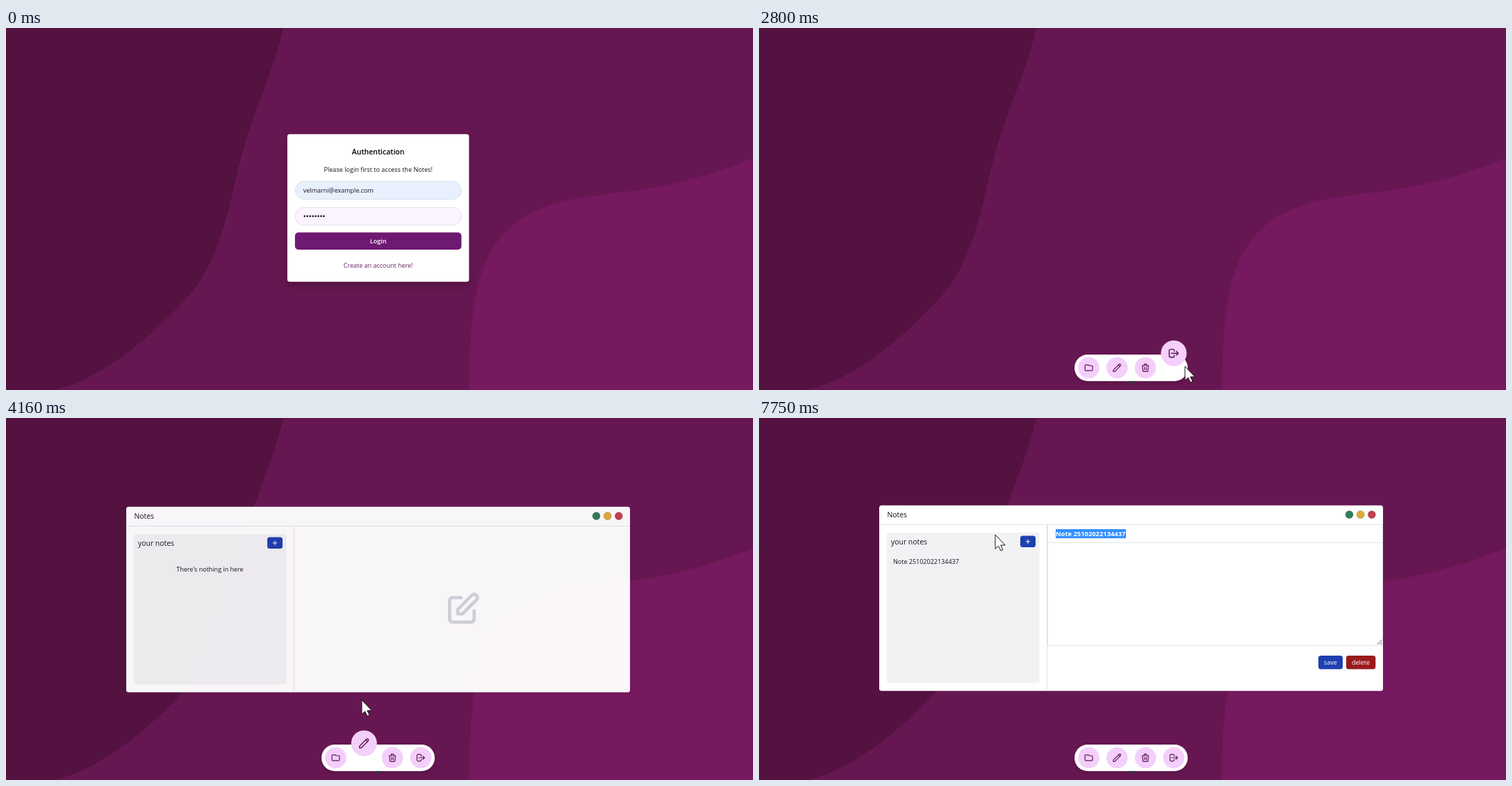
An HTML page that plays this animation: 1075 by 521 pixels, repeating every 8 s.

```html
<!DOCTYPE html>
<html lang="en">
<head>
<meta charset="utf-8">
<title>Notes</title>
<style>
  html, body { margin: 0; width: 100%; height: 100%; overflow: hidden; background: #661751; }
  svg { display: block; width: 1075px; height: 521px; }
  text { font: 9px "Open Sans", "Noto Sans", sans-serif; fill: #1a1220; }
  .mid { text-anchor: middle; }
  .white { fill: #fff; }
  .line { stroke: #e2e4e8; fill: none; }
  .bold { font-weight: 700; font-size: 9.4px; }
  .head { font-size: 10.4px; font-weight: 500; }
  .icon { fill: none; stroke-width: 2; stroke-linecap: round; stroke-linejoin: round; }
  #card { filter: drop-shadow(0 5px 5px rgba(30, 0, 25, .3)); }
  #dock > rect { filter: drop-shadow(0 2px 2px rgba(30, 0, 25, .25)); }
</style>
</head>
<body>
<svg viewBox="0 0 1075 521">
  <rect width="1075" height="521" fill="#661751"/>
  <path fill="#531240" d="M399 0C385 62 357 118 339 183C320 255 310 340 253 396C200 452 140 502 72 521H0V0Z"/>
  <path fill="#76195f" d="M1075 188C1040 200 985 224 897 235C843 242 780 246 735 279C678 322 668 395 666 521H1075Z"/>

  <g id="card">
    <rect x="405" y="153" width="261.5" height="212.5" rx="3.5" fill="#fff"/>
    <text class="mid" x="535.8" y="182" style="font-size:10.5px;font-weight:600;fill:#000">Authentication</text>
    <text class="mid" x="535.8" y="207" style="font-size:9.1px">Please login first to access the Notes!</text>
    <rect x="416.5" y="221" width="239" height="25.5" rx="12.7" fill="#e8f0fd" stroke="#d7deea"/>
    <text x="428" y="237.3">velmarni@example.com</text>
    <rect x="416.5" y="258.5" width="239" height="25.5" rx="12.7" fill="#fcf4ff" stroke="#e6dfec"/>
    <path d="M429.9 271h28" stroke="#1a1220" stroke-width="2.7" stroke-linecap="round" stroke-dasharray="0 3.95"/>
    <rect id="ring" x="414.6" y="293.1" width="242.4" height="27.4" rx="6" fill="none" stroke="#eaaef8" stroke-width="2.6"/>
    <rect x="416" y="294.5" width="239.6" height="24.6" rx="5" fill="#6f1a72"/>
    <text class="mid white" x="535.8" y="310.2" style="font-size:9.1px;font-weight:600">Login</text>
    <text class="mid" x="535.8" y="345.2" style="fill:#6a2368">Create an account here!</text>
  </g>

  <g id="status">
    <path d="M0 504H349q3 0 3 3V521H0Z" fill="#5cb6bf"/>
    <text x="-1" y="516.5" style="font-size:9.6px;fill:#173f48">Waiting for identitytoolkit.googleapis.com...</text>
  </g>

  <g id="win">
    <rect x="173" y="125.7" width="725" height="267" rx="3.5" fill="#fff"/>
    <path class="line" d="M173 153.5H898M414.5 153.5V392.5"/>
    <text class="head" x="184.5" y="143.3">Notes</text>
    <g id="lights"></g>
    <rect x="184" y="165" width="219.5" height="216.5" rx="3.5" fill="#f1f2f4"/>
    <text class="head" x="190" y="182.2">your notes</text>
    <rect x="376" y="169.5" width="22" height="16.5" rx="3.5" fill="#1e40af"/>
    <path d="M383.8 177.8H390.2M387 174.6V181" stroke="#fff"/>
    <text id="empty" class="mid" x="293.5" y="219">There's nothing in here</text>
    <text id="note" x="193" y="210.3">Note 25102022134437</text>
    <path id="blank" class="icon" stroke="#d1d5db" transform="translate(629 244.7) scale(2.35)"
      d="M11 5H6q-2 0-2 2v11q0 2 2 2h11q2 0 2-2v-5M17.6 3.6q1.4-1.2 2.8 0t0 2.8L11.8 15H9v-2.8z"/>
    <g id="editor">
      <rect class="line" x="415.5" y="153.5" width="482" height="26"/>
      <rect class="line" x="415.5" y="179.5" width="482" height="148"/>
      <path d="M889.5 326L896.5 319M893.5 326L896.5 323" stroke="#666"/>
      <text class="bold" x="427" y="170">Note 25102022134437</text>
      <clipPath id="picked"><rect id="pick" y="160" width="101" height="13.3"/></clipPath>
      <g clip-path="url(#picked)">
        <rect x="427" y="160" width="101" height="13.3" fill="#3390ff"/>
        <text class="bold white" x="427" y="170">Note 25102022134437</text>
      </g>
      <rect x="805" y="342" width="35" height="19.5" rx="3.5" fill="#1e40af"/>
      <text class="mid white" x="822.3" y="354.8">save</text>
      <rect x="845" y="342" width="42.3" height="19.5" rx="3.5" fill="#991b1b"/>
      <text class="mid white" x="866" y="354.8">delete</text>
    </g>
  </g>

  <g id="dock">
    <rect x="454" y="470" width="163" height="38.3" rx="19.1" fill="#fff"/>
    <path d="M531 508.3H541Q540 511 536 511T531 508.3" fill="#1d4a3c"/>
    <g id="icons"></g>
  </g>

  <path id="cursor" d="M0 0V20.3L4.6 16.2L8 23L11 21.6L7.8 15H14.3Z" fill="#fff" stroke="#161616"/>
</svg>
<script>
const $ = id => document.getElementById(id);
const show = (id, on) => $(id).style.display = on ? "" : "none";
const place = (el, transform) => el.setAttribute("transform", transform);
const clamp = v => Math.min(1, Math.max(0, v));
const smooth = p => p * p * (3 - 2 * p);

// cubic-bezier(.4, 0, .2, 1), solved by bisection
function ease(p) {
  let lo = 0, hi = 1, s = .5;
  for (let i = 0; i < 18; i++) {
    s = (lo + hi) / 2;
    if (1.2 * s * (1 - s) ** 2 + .6 * s * s * (1 - s) + s ** 3 < p) lo = s; else hi = s;
  }
  return smooth(s);
}
const go = (t, start, length = 300) => ease(clamp((t - start) / length));
const hover = (t, start, end) => go(t, start) - go(t, end);

const LOOP = 8000, TRAVEL = 700;
// cursor stops: arrival time, x, y
const STOPS = [
  [180, 552, 373], [780, 538, 309], [1190, 538, 309], [1260, 302, 297], [1950, 457, 268],
  [2370, 613, 487], [3600, 520, 487], [3880, 520, 487], [4160, 512, 406], [5100, 384, 178],
  [6000, 255, 250], [6350, 249, 208], [7150, 530, 165], [7490, 352, 163], [7750, 340, 168]
];
// the cursor rests at each stop, then takes at most TRAVEL ms to the next
function cursorAt(t) {
  let i = STOPS.findIndex(stop => stop[0] > t);
  if (i < 0) i = STOPS.length - 1;
  const [end, x, y] = STOPS[i], [from, x0, y0] = STOPS[Math.max(0, i - 1)];
  const start = Math.max(from, end - TRAVEL);
  const p = i ? smooth(clamp((t - start) / (end - start))) : 0;
  return [x0 + (x - x0) * p, y0 + (y - y0) * p];
}

// dock icons with the times their hover begins and ends
const ICONS = [
  { d: "M3 7v10q0 2 2 2h14q2 0 2-2V9q0-2-2-2h-6l-2-2H5q-2 0-2 2z" },
  { d: "M3 21v-3.5L16.7 3.7q1.8-1.2 3.2 0t.3 3.5L6.5 21zM15.2 5.2l3.6 3.6", on: 3648, off: 4160 },
  { d: "M5 7l.9 12.3q.1 1.7 2 1.7h8.2q1.9 0 2-1.7L19 7M4 7h16M9 7V4q0-1 1-1h4q1 0 1 1v3M10 11v6M14 11v6", on: 3180, off: 3420 },
  { d: "M7 12h14l-4-4M21 12l-4 4M13 8V7q0-3-3-3H6q-3 0-3 3v10q0 3 3 3h4q3 0 3-3v-1", on: 2480, off: 3140 }
];
$("icons").innerHTML = ICONS.map(({ d }) => `<g><circle r="15.3" fill="#f4cffb"/>
  <path class="icon" stroke="#5a1653" transform="scale(.6) translate(-12 -12)" d="${d}"/></g>`).join("");

const OPENING = ["#2f7f58", "#e0ac36", "#c63f4f"], OPENED = ["#35a06d", "#d9a832", "#e76f3b"];
$("lights").innerHTML = OPENING.map((_, i) =>
  `<circle cx="${849.5 + i * 16.15}" cy="139" r="5.5" stroke="#000" stroke-opacity="0.2"/>`).join("");

function draw(t) {
  const grow = 1 + .1 * (hover(t, 180, 1190) + go(t, 1640));
  show("card", t < 2040);
  place($("card"), `translate(535.6 259.1) scale(${grow}) translate(-535.75 -259.25)`);
  show("ring", t >= 700);
  show("status", t >= 1420 && t < 2100);

  $("dock").style.opacity = go(t, 2340, 200);
  [...$("icons").children].forEach((g, i) => {
    const { on, off } = ICONS[i], lift = on ? hover(t, on, off) : 0;
    place(g, `translate(${474.5 + i * 40.8} ${489 - 20.8 * lift}) scale(${1 + .21 * lift})`);
  });

  const open = go(t, 3780, 500);
  $("win").style.opacity = open;
  place($("win"), `translate(0 ${56 * (1 - open)})`);
  [...$("lights").children].forEach((c, i) => c.setAttribute("fill", (open < 1 ? OPENING : OPENED)[i]));
  show("empty", t < 5400);
  show("note", t >= 5400);
  show("blank", t < 6490);
  show("editor", t >= 6490);

  const [x, y] = cursorAt(t);
  $("pick").setAttribute("x", t < 7150 ? 528 : Math.max(427, x));
  show("cursor", t >= 180 && (t < 2040 || t >= 2370));
  place($("cursor"), `translate(${x} ${y})`);
}

const begin = performance.now();
function tick() {
  draw((performance.now() - begin) % LOOP);
  requestAnimationFrame(tick);
}
tick();
</script>
</body>
</html>
```
